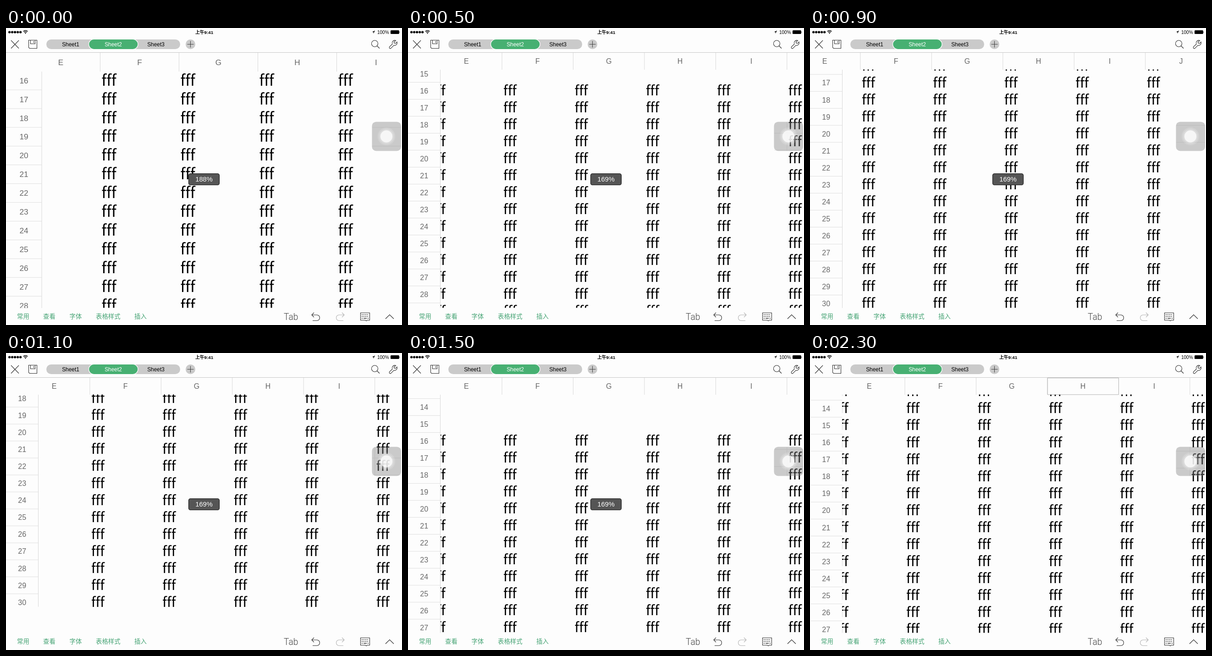
An HTML page with a canvas that plays this animation: 864x648 px, repeating every 2400 ms.

```html
<!DOCTYPE html>
<html lang="zh">
<head>
<meta charset="utf-8">
<title>Spreadsheet</title>
<style>
html, body { margin: 0; width: 100%; height: 100%; overflow: hidden; background: #fdfdfd; }
canvas { display: block; width: 864px; height: 648px; }
</style>
</head>
<body>
<canvas id="stage" width="864" height="648"></canvas>
<script>
const ctx = document.getElementById('stage').getContext('2d');
const BG = '#fdfdfd', GREEN = '#47b072', INK = '#333', RULE = '#d9d9d9';
const SANS = '"Liberation Sans", Arial, sans-serif';
const CJK = '"Liberation Sans", "Noto Sans CJK SC", "Noto Sans CJK", sans-serif';
const CELL = '"Noto Sans CJK SC", "Noto Sans CJK", "Open Sans", sans-serif';
const LOOP = 2400, STEP = 100, SETTLED = 1700;
const TOP = 54, BOTTOM = 611, LAST_ROW = 30;

// time, zoom, left edge of column F, centre of row 16
const KEYS = [
  [0, 188, 205.5, 114.5],
  [500, 169, 205, 137],
  [700, 169, 36.9, 140],
  [1100, 169, 182.9, 25.4],
  [1500, 169, 205, 192],
  [1700, 169, 207, 195.6],
  [2400, 169, 207, 195.6]
];

const mix = (a, b, k) => a + (b - a) * k;

function viewAt(t) {
  let i = 0;
  while (i < KEYS.length - 2 && t >= KEYS[i + 1][0]) i++;
  const a = KEYS[i], b = KEYS[i + 1];
  const k = (t - a[0]) / (b[0] - a[0]);
  const e = k * k * (3 - 2 * k);
  const [, zoom, x, y] = a.map((v, n) => mix(v, b[n], e));
  const big = (zoom - 169) / 19;
  return {
    zoom, x, y,
    colW: mix(155.45, 172, big),
    rowH: mix(37.03, 40.93, big),
    headW: mix(70.5, 78, big),
    headY: mix(91, 95, big),
    label: mix(16, 17.2, big),
    cell: mix(29.8, 33, big),
    drop: mix(9.9, 11.2, big),
    settled: t >= SETTLED
  };
}

function text(s, x, y, size, color, align = 'center', font = SANS, weight = 400) {
  ctx.font = `${weight} ${size}px ${font}`;
  ctx.textAlign = align;
  ctx.fillStyle = color;
  ctx.fillText(s, x, y);
}

function path(d, color = INK, width = 1.1, fill) {
  const p = new Path2D(d);
  if (fill) { ctx.fillStyle = fill; ctx.fill(p); }
  if (color) { ctx.strokeStyle = color; ctx.lineWidth = width; ctx.stroke(p); }
}

function box(x, y, w, h, r, fill, stroke, width = 1) {
  ctx.beginPath();
  ctx.roundRect(x, y, w, h, r);
  if (fill) { ctx.fillStyle = fill; ctx.fill(); }
  if (stroke) { ctx.strokeStyle = stroke; ctx.lineWidth = width; ctx.stroke(); }
}

function disc(x, y, r, fill, stroke) {
  ctx.beginPath();
  ctx.arc(x, y, r, 0, Math.PI * 2);
  if (fill) { ctx.fillStyle = fill; ctx.fill(); }
  if (stroke) { ctx.strokeStyle = stroke; ctx.lineWidth = 1.1; ctx.stroke(); }
}

function clipped(x, y, w, h, draw) {
  ctx.save();
  ctx.beginPath();
  ctx.rect(x, y, w, h);
  ctx.clip();
  draw();
  ctx.restore();
}

const hLine = (x, y, w) => ctx.fillRect(x, y - 0.5, w, 1);
const vLine = (x, y, h) => ctx.fillRect(x - 0.5, y, 1, h);

function drawSheet(v) {
  const rowY = r => v.y + (r - 16) * v.rowH;
  const colX = c => v.x + (c - 5) * v.colW;
  const end = Math.min(BOTTOM, rowY(LAST_ROW) + v.drop);
  const firstRow = v.settled ? 1 : 16;

  clipped(v.headW - 0.5, v.headY - 0.5, 864, BOTTOM - v.headY, () => {
    ctx.textRendering = 'optimizeSpeed'; // keeps the letters unjoined
    for (let r = firstRow; r <= LAST_ROW; r++)
      for (let c = 4; c <= 9; c++)
        text('fff', colX(c) + 3, rowY(r) + v.drop, v.cell, '#000', 'left', CELL);
  });

  // grid lines only show beneath the floating button
  clipped(799, 205, 63, 63, () => {
    ctx.fillStyle = '#e6e6e6';
    for (let r = 10; r <= LAST_ROW; r++) hLine(799, rowY(r) + v.rowH / 2, 63);
    for (let c = 6; c <= 10; c++) vLine(colX(c), 205, 63);
  });

  clipped(0, v.headY, v.headW + 1, BOTTOM - v.headY, () => {
    const inset = v.settled ? 2 : 0;
    for (let r = 8; r <= LAST_ROW; r++) {
      text(r, v.headW / 2, rowY(r) + v.label * 0.36, v.label, '#666');
      ctx.fillStyle = '#dfdfdf';
      if (r < LAST_ROW) hLine(inset, rowY(r) + v.rowH / 2, v.headW - inset);
    }
  });
  if (!v.settled) {
    ctx.fillStyle = RULE;
    vLine(v.headW, v.headY, end - v.headY);
  }

  const midY = (TOP + v.headY) / 2;
  for (let c = 4; c <= 9; c++) {
    text('ABCDEFGHIJ'[c], colX(c) + v.colW / 2, midY + v.label * 0.36, v.label, '#666');
    ctx.fillStyle = RULE;
    if (c > 4 && colX(c) > v.headW) vLine(colX(c), TOP, v.headY - TOP);
  }
  if (v.settled) box(518.3, 54.5, 155.2, 36.3, 0, null, '#b4b4b4');
}

function drawStatus() {
  for (let i = 0; i < 5; i++) disc(7.6 + i * 6, 9, 2.6, '#000');
  path('M37.6 7.6 Q42.5 3.2 47.4 7.6 M39.4 9.6 Q42.5 6.8 45.6 9.6', '#000', 1.4);
  path('M40.8 10.9 Q42.5 9.5 44.2 10.9 L42.5 12.8Z', null, 0, '#000');
  text('上午9:41', 432.5, 12.6, 9.8, '#000', 'center', CJK, 700);
  path('M805 5.4 L798.6 8.8 H801.7 V12.4Z', null, 0, '#000');
  text('100%', 810, 12.6, 10, '#000', 'left');
  box(839, 5, 18.8, 8, 1.6, '#000');
  path('M858.6 7.4 Q860.4 9 858.6 10.8Z', null, 0, '#000');
}

function drawToolbar() {
  ctx.fillStyle = '#c6c6c6';
  hLine(0, 53.5, 864);
  path('M11 27 L28 44.5 M28 27 L11 44.5');
  path('M49.5 26.5 H67.5 V44.5 H51.5 L49.5 42.5Z M53.5 26.5 V34.5 H63.5 V26.5 M60.5 28.5 V32.5');

  box(88, 25, 292, 21, 10.5, '#cacaca');
  box(180.5, 24.5, 107.5, 22, 11, GREEN, '#fff', 1.2);
  text('Sheet1', 141, 39.7, 11.9, '#000');
  text('Sheet2', 234, 39.7, 11.9, '#fff');
  text('Sheet3', 327, 39.7, 11.9, '#000');

  disc(402.5, 35.5, 10.5, '#cacaca');
  path('M395.5 35.5 H409.5 M402.5 28.5 V42.5', '#444');

  disc(804.5, 34, 7, null, INK);
  path('M809.5 39 L815 44.5', INK, 1.3);
  path('M850.5 27.2 Q845.5 26 843.2 30 Q842 32.5 843 35 L836.6 41.2 ' +
    'Q835.6 43 837 44.3 Q838.5 45.4 840 44.2 L846.2 37.8 Q849.6 38.8 852 36.2 ' +
    'Q854 33.8 853.2 30.4 L849.8 33.6 L846.8 32.8 L846.6 30.6Z');
}

function drawFooter() {
  const items = [['常用', 24], ['查看', 81], ['字体', 138.5], ['表格样式', 196], ['插入', 280]];
  for (const [s, x] of items) text(s, x, 634.2, 13.4, '#45a374', 'left', CJK);
  text('Tab', 621.8, 637, 19.3, '#444', 'center', 'Roboto, "Liberation Sans", sans-serif', 300);

  path('M672 621 L667 626 L672 631 M667 626 H678 C686.5 626 686.5 638.5 678 638.5 H669');
  path('M733 621 L738 626 L733 631 M738 626 H727 C718.5 626 718.5 638.5 727 638.5 H736', '#b4b4b4');

  path('M773.5 621.5 H793.5 V637.5 H788 L786 639 L784 637.5 H773.5Z');
  ctx.save();
  ctx.setLineDash([2, 1.6]);
  path('M776 625.5 H791 M776 629.5 H791', INK, 1.3);
  ctx.restore();
  path('M776 633.5 H778 M780 633.5 H787 M789 633.5 H791', INK, 1.3);
  path('M828 634.5 L837 625.5 L846 634.5', INK, 1.2);
}

function drawOverlay(v) {
  box(798.5, 204.7, 63.5, 63.5, 9, 'rgba(126,126,126,0.4)');
  disc(830, 236.5, 19.5, 'rgba(255,255,255,0.14)');
  disc(830, 236.5, 16.3, 'rgba(255,255,255,0.2)');
  disc(830, 236.5, 13.2, 'rgba(255,255,255,0.75)');
  if (v.settled) return;
  box(398.5, 317.8, 67, 24.7, 4, '#555', '#222', 1.2);
  text(Math.round(v.zoom) + '%', 432, 335.2, 14.7, '#fff');
}

function frame(now) {
  const t = Math.floor((now % LOOP) / STEP) * STEP;
  const v = viewAt(t);
  ctx.fillStyle = BG;
  ctx.fillRect(0, 0, 864, 648);
  drawSheet(v);
  drawStatus();
  drawToolbar();
  drawFooter();
  drawOverlay(v);
}

const start = performance.now();
function tick() {
  frame(performance.now() - start);
  requestAnimationFrame(tick);
}
tick();
</script>
</body>
</html>
```
